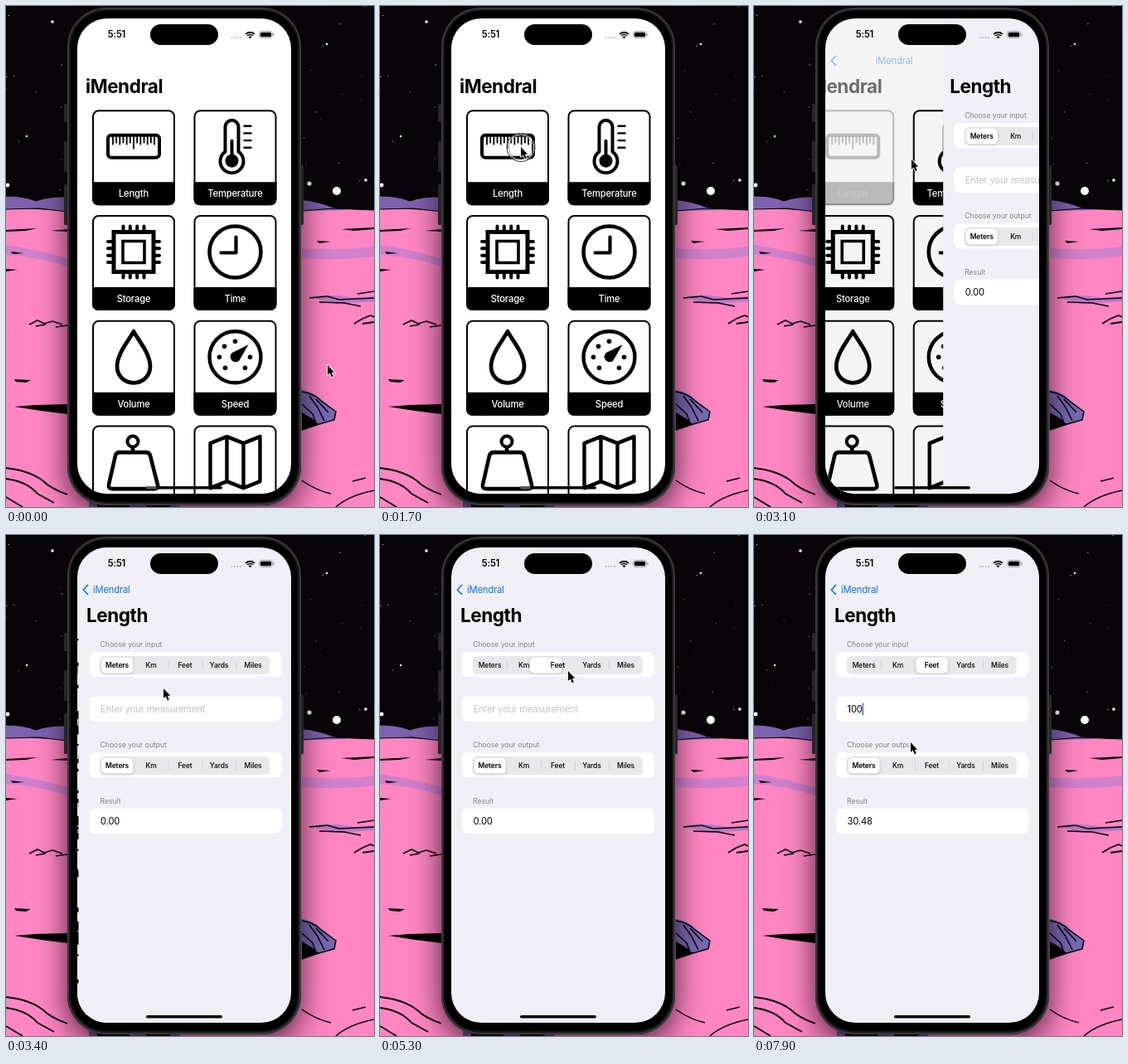
Animation, 444 px wide and 604 px high, one loop 8000 ms. Source, as an HTML page with a canvas:

```html
<!DOCTYPE html>
<html lang="en">
<head>
<meta charset="utf-8">
<title>Unit converter</title>
<style>
html, body { margin: 0; width: 444px; height: 604px; overflow: hidden; background: #000; }
canvas { display: block; }
</style>
</head>
<body>
<canvas id="stage" width="444" height="604"></canvas>
<script>
const ctx = document.getElementById('stage').getContext('2d');
const LOOP = 8000, STEP = 100;
const APP = 'iMendral';
const SCREEN = { x: 86, y: 15, w: 258, h: 573, r: 36 };
const UNITS = ['Meters', 'Km', 'Feet', 'Yards', 'Miles'];
const BLUE = '#0a74ea';

// time, x, y of the pointer's resting points
const POINTER = [
  [0, 388, 433], [500, 388, 433], [1500, 170, 170], [2300, 170, 170], [2700, 190, 185],
  [4500, 190, 185], [5100, 227, 164], [5600, 227, 164], [6200, 225, 206],
  [7400, 225, 206], [7900, 189, 250]
];
const CLICKS = [1700, 2900, 5200, 6400];

// ---- helpers
const ease = k => k * k * (3 - 2 * k);
const spring = (ms, rate) => {
  if (ms <= 0) return 0;
  const k = ms / 1000 * rate;
  return 1 - (1 + k) * Math.exp(-k);
};

function rrect(x, y, w, h, r, fill) {
  ctx.beginPath();
  ctx.roundRect(x, y, w, h, r);
  if (fill) { ctx.fillStyle = fill; ctx.fill(); }
}

function text(str, x, y, size, weight = 400, color = '#000', align = 'left', spacing = -0.015) {
  ctx.font = `${weight} ${size}px Inter, "Open Sans", sans-serif`;
  ctx.letterSpacing = `${spacing * size}px`;
  ctx.textAlign = align;
  ctx.textBaseline = 'alphabetic';
  ctx.fillStyle = color;
  ctx.fillText(str, x, y);
}

function line(d, width, color = '#000') {
  ctx.lineWidth = width;
  ctx.strokeStyle = color;
  ctx.stroke(new Path2D(d));
}

function shape(d, color = '#000') {
  ctx.fillStyle = color;
  ctx.fill(new Path2D(d));
}

function disc(x, y, r, color = '#000') {
  ctx.beginPath();
  ctx.arc(x, y, r, 0, Math.PI * 2);
  ctx.fillStyle = color;
  ctx.fill();
}

function ring(x, y, r, width, color = '#000') {
  ctx.beginPath();
  ctx.arc(x, y, r, 0, Math.PI * 2);
  ctx.lineWidth = width;
  ctx.strokeStyle = color;
  ctx.stroke();
}

function layer(draw) {
  ctx.save();
  draw();
  ctx.restore();
}

// ---- backdrop
function drawSky() {
  ctx.fillStyle = '#080508';
  ctx.fillRect(0, 0, 444, 260);
  let seed = 11;
  const rnd = () => (seed = seed * 16807 % 2147483647) / 2147483647;
  for (let i = 0; i < 26; i++) {
    const side = i % 2 ? 358 : 0;
    disc(side + rnd() * (side ? 86 : 70), rnd() * 222, 0.35 + rnd() * 0.5, '#a9a5a9');
  }
  [[399, 223, 5], [366, 214, 2.6], [434, 210, 1.8], [56, 19, 1.8], [2, 216, 2.4], [25, 157, 1.2], [387, 46, 1.3]]
    .forEach(([x, y, r]) => disc(x, y, r, '#fff'));
}

function drawGround() {
  shape('M0 243L74 247H357L392 244L444 246V604H0Z', '#ff86c3');
  shape('M0 229Q22 229 36 235Q52 229 74 230V248L40 244L0 245Z', '#7c62ae');
  shape('M357 234Q376 236 394 243L412 246L357 247Z', '#7c62ae');
  line('M0 229Q22 229 36 235Q52 229 74 230M0 245L40 244L74 248M357 247L394 244L444 246', 1.2);
  shape('M0 288Q30 292 74 304V314Q42 303 0 300Z', '#cf80cc');
  shape('M357 292Q398 296 444 290V302Q406 307 357 304Z', '#d181cb');
  shape('M366 351Q390 346 420 352L444 350V356L396 359Z', '#ba78c5');

  shape('M0 270L38 268L24 271L0 272ZM54 271L74 269V272ZM404 269L444 267V269L420 271Z');
  shape('M6 296L22 298L8 299ZM0 317L14 318L0 320ZM375 283L392 284L378 286Z');
  shape('M10 450L30 451L24 454L12 453Z');
  shape('M10 483L36 481L74 480V492L42 488Z');
  line('M28 384L38 379L46 383L56 380L68 384M36 386L48 384M60 387L74 385', 1.6);
  line('M366 352L388 350L402 354L444 352M378 357L408 358L428 362M424 347L444 344', 1.4);
  line('M420 383L430 377L440 373L444 375M430 383L444 381', 1.8);
  line('M0 557Q28 560 44 572Q54 582 74 589M0 570Q25 573 38 588L58 599M0 592L20 604', 1.8);
  line('M357 572Q374 584 392 588M398 604Q414 590 444 584M418 573L434 569', 1.5);

  shape('M352 462Q370 464 380 474L398 489L396 499L378 504L352 513Z', '#7969b4');
  line('M357 465Q371 467 380 476L398 489L396 499L378 504L357 511M366 470L376 484L384 500M374 474L389 490M357 480L370 492L374 503', 1.5);
  shape('M357 490L369 497L377 504L357 511Z');
  shape('M100 598H210V604H100Z', '#75559d');
  shape('M110 600L145 598L150 604H110ZM166 599L204 600L196 604H170Z');
}

function drawPhone() {
  layer(() => {
    ctx.shadowColor = 'rgba(20,0,15,.75)';
    ctx.shadowBlur = 36;
    ctx.shadowOffsetY = 10;
    rrect(74, 2, 282, 600, 47, '#000');
  });
  [[118, 22], [163, 37], [215, 49]].forEach(([y, h]) => rrect(70, y, 5, h, 1.5, '#262628'));
  rrect(355, 192, 4, 72, 1.5, '#262628');
  rrect(74, 2, 282, 600, 47, '#39393b');
  rrect(76, 4, 278, 596, 45, '#171718');
  rrect(78, 6, 274, 592, 43, '#000');
}

// ---- home screen, each icon drawn around its card's centre point
const ICONS = {
  Length() {
    rrect(-31, -14, 62, 27, 4);
    ctx.lineWidth = 4;
    ctx.stroke();
    for (let i = 0; i < 13; i++) {
      const x = -25 + i * 4.17;
      const len = i === 6 ? 14 : i % 2 ? 7 : 9;
      line(`M${x} -12v${len}`, 1.8);
    }
  },
  Temperature() {
    line('M-12 6V-24A8 8 0 0 1 4 -24V6A14 14 0 1 1 -12 6Z', 4);
    line('M-4 -7V17', 4);
    disc(-4, 17, 8);
    for (let y = -25; y < 5; y += 8.7) line(`M11 ${y}h8`, 2.4);
  },
  Storage() {
    ctx.lineJoin = 'miter';
    line('M-24 -24H24V24H-24Z', 5);
    line('M-13 -13H13V13H-13Z', 3.6);
    for (const p of [-12.5, -4.2, 4.2, 12.5])
      line(`M${p} -31V-25M${p} 25V31M-31 ${p}H-25M25 ${p}H31`, 4);
  },
  Time() {
    ring(0, 0, 31, 4.6);
    line('M1 -18V1H-17', 4.2);
  },
  Volume() {
    line('M0 -31C-6 -20 -20 -4 -20 11C-20 23 -11 31 0 31C11 31 20 23 20 11C20 -4 6 -20 0 -31Z', 4.8);
  },
  Speed() {
    ring(0, 0, 31, 4.4);
    [[-19, 0], [-13, -13], [0, -19], [18, 0], [-12, 13], [12, 13]].forEach(([x, y]) => disc(x, y, 2.8));
    shape('M16 -15L5 4A6 6 0 1 1 -4 -5Z');
  },
  Weight() {
    ring(-1, -25, 6.5, 4);
    line('M-1 -18V-12M-17 -12H15Q19 -12 20 -8L29 27Q30 32 25 32H-25Q-31 32 -30 27L-22 -8Q-21 -12 -17 -12Z', 4.6);
  },
  Distance() {
    line('M-30 -23L-10 -31L10 -23L30 -31V23L10 31L-10 23L-30 31ZM-10 -31V23M10 -23V31', 4.4);
  }
};

function drawCard(name, x, y, pressed) {
  layer(() => {
    ctx.translate(x, y);
    if (pressed) ctx.globalAlpha = 0.24;
    rrect(1, 1, 98, 113, 7, '#fff');
    ctx.lineWidth = 2;
    ctx.strokeStyle = '#000';
    ctx.stroke();
    rrect(0, 87, 100, 28, [0, 0, 7, 7], '#000');
    layer(() => {
      ctx.translate(50, 44.5);
      ctx.lineCap = ctx.lineJoin = 'round';
      ICONS[name]();
    });
    text(name, 50, 105, 11.2, 500, '#fff', 'center');
  });
}

function drawHome(t, progress) {
  ctx.fillStyle = '#fff';
  ctx.fillRect(SCREEN.x, SCREEN.y, SCREEN.w, SCREEN.h);
  layer(() => {
    ctx.globalAlpha = 1 - progress;
    text(APP, 96, 105, 22.5, 700, '#000', 'left', -0.02);
  });
  Object.keys(ICONS).forEach((name, i) => {
    const pressed = name === 'Length' && t >= 2900 && t < 3200;
    drawCard(name, i % 2 ? 226.5 : 104, 125.2 + (i >> 1) * 126.8, pressed);
  });
}

// ---- converter screen
function drawSegments(y, pos) {
  rrect(112, y, 205, 22, 5.5, '#e8e8ea');
  for (let i = 1; i < 5; i++) {
    if (Math.abs(i - 0.5 - pos) < 0.9) continue;
    ctx.fillStyle = '#d2d2d6';
    ctx.fillRect(112 + i * 41, y + 6, 1, 10);
  }
  layer(() => {
    ctx.shadowColor = 'rgba(0,0,0,.18)';
    ctx.shadowBlur = 4;
    ctx.shadowOffsetY = 1;
    rrect(113.5 + pos * 41, y + 1.5, 38, 19, 5, '#fff');
  });
  UNITS.forEach((unit, i) => text(unit, 132.5 + i * 41, y + 14, 8.5, Math.abs(i - pos) < 0.5 ? 600 : 500, '#000', 'center'));
}

function drawForm(t, typed) {
  const label = (str, y) => text(str, 112, y, 8.6, 400, '#808086', 'left', 0);
  const cell = y => rrect(99, y, 232, 30, 6.5, '#fff');
  label('Choose your input', 135);
  cell(141.3);
  drawSegments(146, 2 * spring(t - 5150, 21));
  cell(194.7);
  if (typed) text(typed, 112.5, 214, 11.2);
  else text('Enter your measurement', 112.5, 214, 11.2, 400, '#c4c4c8');
  if (t >= 6700) {
    const width = typed ? ctx.measureText(typed).width : 0;
    ctx.fillStyle = '#2f72d8';
    ctx.fillRect(112.5 + width, 202.5, 1.4, 15);
  }
  label('Choose your output', 256);
  cell(262.3);
  drawSegments(267, 0);
  label('Result', 323.5);
  cell(329.8);
  text((Number(typed) * 0.3048).toFixed(2), 112.5, 349, 11.2);
}

function drawConverter(t, offset, progress) {
  const typed = '100'.slice(0, t < 7400 ? 0 : t < 7500 ? 1 : t < 7600 ? 2 : 3);
  layer(() => {
    ctx.translate(offset, 0);
    ctx.fillStyle = '#f0eff5';
    ctx.fillRect(SCREEN.x, SCREEN.y, SCREEN.w, SCREEN.h);
    drawForm(t, typed);
  });
  const navOffset = Math.max(0, offset - 3);
  text('Length', 97 + navOffset, 105, 22.5, 700, '#000', 'left', -0.02);
  layer(() => {
    ctx.globalAlpha = progress;
    ctx.lineCap = ctx.lineJoin = 'round';
    line('M98.5 60.5L93.3 66L98.5 71.5', 1.7, BLUE);
    text(APP, 105 + navOffset * 0.3, 70, 11.2, 400, BLUE);
  });
}

// ---- overlays
function drawStatusBar() {
  rrect(174, 22, 82, 25, 12.5, '#000');
  text('5:51', 133.5, 38.3, 11.2, 600, '#000', 'center');
  for (let i = 0; i < 4; i++) disc(272.5 + i * 3.5, 38, 1.1, '#b9b9bc');
  layer(() => {
    ctx.beginPath();
    ctx.moveTo(294.5, 39.2);
    ctx.arc(294.5, 39.2, 8.6, -Math.PI * 0.76, -Math.PI * 0.24);
    ctx.clip();
    ring(294.5, 39.2, 7.5, 1.9);
    ring(294.5, 39.2, 4.7, 1.7);
    disc(294.5, 39.2, 2.6);
  });
  rrect(305.5, 30.5, 16, 8, 2.6);
  ctx.lineWidth = 0.8;
  ctx.strokeStyle = '#9a9a9d';
  ctx.stroke();
  rrect(306.8, 31.8, 13.4, 5.4, 1.5, '#000');
  rrect(322.4, 33, 1.2, 3, 0.6, '#9a9a9d');
}

function drawHomeBar(onHome) {
  rrect(169, 579, 92, 3.4, 1.7, '#000');
  if (onHome) rrect(169, 579, 13, 3.4, 1.7, '#58585a');
}

function pointerAt(t) {
  let i = POINTER.findIndex(p => p[0] > t);
  if (i < 0) return POINTER[POINTER.length - 1].slice(1);
  const [t0, x0, y0] = POINTER[i - 1], [t1, x1, y1] = POINTER[i];
  const k = ease((t - t0) / (t1 - t0));
  return [x0 + (x1 - x0) * k, y0 + (y1 - y0) * k];
}

function drawPointer(t) {
  const [x, y] = pointerAt(t);
  if (CLICKS.includes(t)) {
    ring(x, y + 0.5, 15.8, 1, 'rgba(255,255,255,.8)');
    ring(x, y + 0.5, 17, 1.1, '#4a4a4a');
    ring(x, y + 0.5, 14.6, 0.7, '#777');
  }
  layer(() => {
    ctx.translate(x, y);
    ctx.lineJoin = 'round';
    const arrow = 'M0 0V11.8L2.7 9.4L4.8 14.2L6.8 13.3L4.8 8.7H8.3Z';
    line(arrow, 1.8, '#fff');
    shape(arrow);
  });
}

function draw(t) {
  const progress = spring(t - 3020, 19);
  const offset = t >= 3600 ? 0 : SCREEN.w * (1 - progress);
  drawSky();
  drawGround();
  drawPhone();
  layer(() => {
    rrect(SCREEN.x, SCREEN.y, SCREEN.w, SCREEN.h, SCREEN.r);
    ctx.clip();
    if (offset > 0) {
      layer(() => {
        ctx.translate(-0.3 * SCREEN.w * progress, 0);
        drawHome(t, progress);
      });
      ctx.fillStyle = `rgba(0,0,0,${0.1 * progress})`;
      ctx.fillRect(SCREEN.x, SCREEN.y, SCREEN.w, SCREEN.h);
    }
    if (progress > 0) drawConverter(t, offset, progress);
    drawStatusBar();
    drawHomeBar(progress === 0);
  });
  drawPointer(t);
}

let shown = -1;
function tick(now) {
  const t = Math.floor(now % LOOP / STEP) * STEP;
  if (t !== shown) draw(shown = t);
  requestAnimationFrame(tick);
}
draw(0);
requestAnimationFrame(tick);
</script>
</body>
</html>
```
